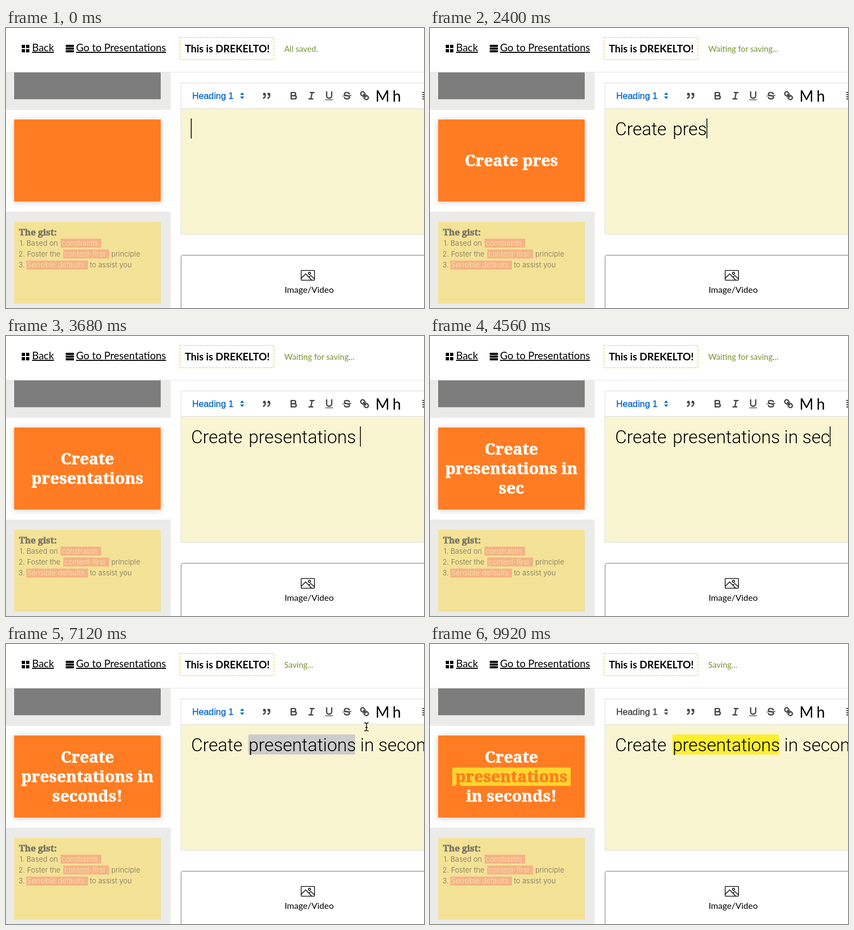
Write an HTML page that moves like this. It is 770 by 517 pixels and loops after 10000 ms.

```html
<!DOCTYPE html>
<html lang="en">
<head>
<meta charset="utf-8">
<style>
  html, body { margin: 0; width: 100%; height: 100%; overflow: hidden; background: #fff; }
  svg { display: block; }
  text { font-family: Lato, sans-serif; }
  .link { font-size: 19px; text-decoration: underline; }
  .status { font-size: 15px; fill: #76932f; }
  .serif text, text.serif { font-family: "Noto Serif", serif; font-weight: 700; stroke-width: .7; }
  #slide { font-size: 29.5px; text-anchor: middle; }
  .list text { font: 300 13.3px Inter, sans-serif; fill: #77715a; }
  .list .marked { fill: #f7e9a5; }
  #editor text { font: 300 33px Roboto, sans-serif; }
  .icon { fill: none; stroke: #444; stroke-width: 2; stroke-linecap: round; stroke-linejoin: round; }
  #heading text { font: 16.7px "Liberation Sans", Arial, sans-serif; stroke-width: .4; }
</style>
</head>
<body>
<svg width="770" height="517" viewBox="0 0 770 517">
  <defs>
    <filter id="shadow" x="-20%" y="-20%" width="140%" height="140%">
      <feDropShadow dx="0" dy="1" stdDeviation="6" flood-opacity=".2"/>
    </filter>
  </defs>

  <!-- header -->
  <path d="M0 81.5H770" stroke="#e6e6e6"/>
  <path d="M29 31h6v6h-6zm8 0h6v6h-6zm-8 8h6v6h-6zm8 0h6v6h-6zM110 31h15v4h-15zm0 5h15v4h-15zm0 5h15v4h-15z"/>
  <text class="link" x="48" y="43">Back</text>
  <text class="link" x="129" y="43">Go to Presentations</text>
  <rect x="320.5" y="17.5" width="173" height="41" fill="none" stroke="#f5c822" stroke-dasharray="4 2"/>
  <text x="329.5" y="44.5" font-size="18.7" font-weight="700">This is DREKELTO!</text>
  <text class="status" id="status" x="512.5" y="43.5"></text>

  <!-- slide list -->
  <path d="M0 82H303.5V151H0zM0 339H303.5V517H0z" fill="#ebebea"/>
  <rect x="15" y="82" width="270" height="49.5" fill="#7d7d7d"/>
  <rect x="15" y="169" width="270" height="151.5" fill="#ff7b21" filter="url(#shadow)"/>
  <rect id="slideMark" x="41" y="228" width="218" height="34" fill="#ffd52e"/>
  <g id="slide" class="serif"><text x="150"/><text x="150"/><text x="150"/></g>
  <rect x="15" y="358" width="270" height="151" fill="#f4e297"/>
  <text class="serif" x="24" y="383" font-size="16.3" fill="#7c7865" stroke="#7c7865">The gist:</text>
  <path d="M100.5 389H175.5V405.5H100.5zM105.5 409H190V425.5H105.5zM37.5 429.5H151V446H37.5z" fill="#f5b287"/>
  <g class="list">
    <text x="25" y="402">1. Based on</text><text class="marked" x="102.5" y="402">constraints</text>
    <text x="23" y="422">2. Foster the</text><text class="marked" x="107.5" y="422">content-first</text><text x="194" y="422">principle</text>
    <text x="23" y="442">3.</text><text class="marked" x="39" y="442">Sensible defaults</text><text x="154.5" y="442">to assist you</text>
  </g>

  <!-- editor -->
  <rect x="322.5" y="148.5" width="460" height="232.5" fill="#f9f5d1" stroke="#dcdcd6"/>
  <rect x="322.5" y="101.5" width="460" height="47" fill="#fff" stroke="#dedede"/>
  <g id="heading">
    <text x="343" y="131">Heading 1</text>
    <path d="M431 123.5l4-4.5 4 4.5zM431 126.5l4 4.5 4-4.5z"/>
  </g>
  <g class="icon" transform="translate(0 114.5) scale(1.17)">
    <g transform="translate(401.3)"><path d="M4.5 5.5h2v2h-2zM11.5 5.5h2v2h-2z" fill="#444"/><path d="M7 8c0 4-3 5-3 5M14 8c0 4-3 5-3 5"/></g>
    <path transform="translate(444)" d="M5 4H9.5a2.5 2.5 0 0 1 0 5H5zM5 9h5.5a2.5 2.5 0 0 1 0 5H5z"/>
    <path transform="translate(472)" d="M7 4h6M5 14h6M8 14L10 4"/>
    <g transform="translate(499.8)"><path d="M5 3V9a4 4 0 0 0 8 0V3"/><path d="M3.5 15.5h11" stroke-width="1"/></g>
    <g transform="translate(527.8)"><path d="M12.9 6C12 3.3 5 3.2 5 6.5 5 8 6.5 8.7 9 9s4 1 4 2.5C13 14.8 6 14.7 5.1 12"/><path d="M2.5 9.5l13-1" stroke-width="1.2"/></g>
    <g transform="translate(555.5)"><path d="M7 7l4 4"/><rect x="2.8" y="3.2" width="7.2" height="6" rx="3" transform="rotate(45 6.4 6.2)"/><rect x="8" y="8.8" width="7.2" height="6" rx="3" transform="rotate(45 11.6 11.8)"/></g>
  </g>
  <rect id="active" x="677" y="111" width="32" height="28" rx="2" fill="#eee"/>
  <text x="680.5" y="135.5" font-size="28">M</text>
  <text x="712" y="135.5" font-size="28">h</text>
  <path d="M767 119h3M767 123h3M767 127h3M767 131h3" stroke="#444" stroke-width="2"/>
  <rect id="mark" x="446.5" y="167" width="196.5" height="37"/>
  <g id="editor"><text x="341" y="198"/><text x="447" y="198"/><text x="652.5" y="198"/><text x="686" y="198"/></g>
  <rect id="caret" y="167" width="1.5" height="37"/>

  <!-- media box -->
  <rect x="322.5" y="419.5" width="470" height="120" rx="4" fill="#fff" stroke="#777"/>
  <g fill="none" stroke="#000" stroke-width="1.3">
    <rect x="543.7" y="447.7" width="24.6" height="18" rx="1"/>
    <path d="M544 462l8-8 11 11.5M558 460l3.5-3 6.5 6"/><circle cx="559" cy="453" r="2"/>
  </g>
  <text x="558.5" y="489" font-size="16" text-anchor="middle">Image/Video</text>

  <g id="pointer">
    <path id="beam" d="M-4-7.5q4 0 4 2.5q0-2.5 4-2.5M0-5V5M-4 7.5q4 0 4-2.5q0 2.5 4 2.5M-2 1h4" fill="none" stroke="#000" stroke-width="1.3"/>
    <path id="arrow" d="M0 0V15.5l3.6-3.4 2.6 6 2.8-1.2-2.6-5.8H11z" stroke="#fff"/>
  </g>
</svg>
<script>
const $ = id => document.getElementById(id);
const show = (id, on) => $(id).setAttribute('visibility', on ? 'visible' : 'hidden');
const lerp = (a, b, k) => a + (b - a) * k;

// [keys, start ms, ms per key]
const typing = [['Cr', 400, 320], ['eate ', 960, 180], ['present', 2000, 130],
  [['at', ...'ions '], 3040, 125], ['in secon', 3840, 125], ['ds!', 4880, 200]];
// [start ms, text]
const statuses = [[0, 'All saved.'], [400, 'Waiting for saving...'], [7040, 'Saving...'],
  [7480, 'All saved.'], [9600, 'Saving...']];
// [ms, x, y]
const path = [[5440, 764, 240], [6400, 600, 188], [6640, 600, 188], [7120, 664, 153],
  [7560, 690, 130], [8000, 690, 130], [8640, 676, 145], [8800, 757, 141], [8920, 785, 141]];
const SELECT = 6480, FORMAT = 7680, BLUR = 9440;

function typedAt(t) {
  return typing.map(([keys, start, step]) =>
    t < start ? '' : [...keys].slice(0, Math.floor((t - start) / step) + 1).join('')).join('');
}

function wrap(text, limit) {
  const lines = [''];
  for (const word of text.trim().split(' ')) {
    const line = (lines.at(-1) + ' ' + word).trim();
    if (line.length > limit) lines.push(word);
    else lines[lines.length - 1] = line;
  }
  return lines;
}

function drawSlide(text, marked) {
  const lines = marked ? ['Create', 'presentations', 'in seconds!'] : wrap(text, 16);
  [...$('slide').children].forEach((el, i) => {
    const color = marked && i === 1 ? '#ff7b21' : '#fff';
    el.textContent = lines[i] || '';
    el.setAttribute('y', 255 + (i - (lines.length - 1) / 2) * 36);
    el.setAttribute('fill', color);
    el.setAttribute('stroke', color);
  });
  show('slideMark', marked);
}

function drawEditor(text, t) {
  const words = text.split(' ');
  const fields = [...$('editor').children];
  fields.forEach((el, i) => el.textContent = words[i] || '');
  const last = fields[words.length - 1];
  const width = last.textContent ? last.getComputedTextLength() : 0;
  $('caret').setAttribute('x', +last.getAttribute('x') + width - .5);
  show('caret', (t < 160 || t >= 400) && t < SELECT);
  show('mark', t >= SELECT);
  $('mark').setAttribute('fill', t >= BLUR ? '#ffee2e' : t >= FORMAT ? '#c7ca8d' : '#cbcccb');
  show('active', t >= FORMAT && t < BLUR);
  const color = t >= BLUR ? '#444' : '#0b6acb';
  $('heading').setAttribute('fill', color);
  $('heading').firstElementChild.setAttribute('stroke', color);
}

function drawPointer(t) {
  const next = path.findIndex(p => p[0] > t);
  const on = next > 0;
  let x = 0, y = 0;
  if (on) {
    const a = path[next - 1], b = path[next], k = (t - a[0]) / (b[0] - a[0]);
    x = lerp(a[1], b[1], k);
    y = lerp(a[2], b[2], k);
  }
  $('pointer').setAttribute('transform', `translate(${x} ${y})`);
  show('beam', on && y >= 149);
  show('arrow', on && y < 149);
}

function frame(now) {
  const t = Math.floor(now % 10000 / 80) * 80;
  const text = typedAt(t);
  $('status').textContent = statuses.findLast(s => s[0] <= t)[1];
  drawSlide(text, t >= FORMAT);
  drawEditor(text, t);
  drawPointer(t);
  requestAnimationFrame(frame);
}
frame(0);
</script>
</body>
</html>
```
